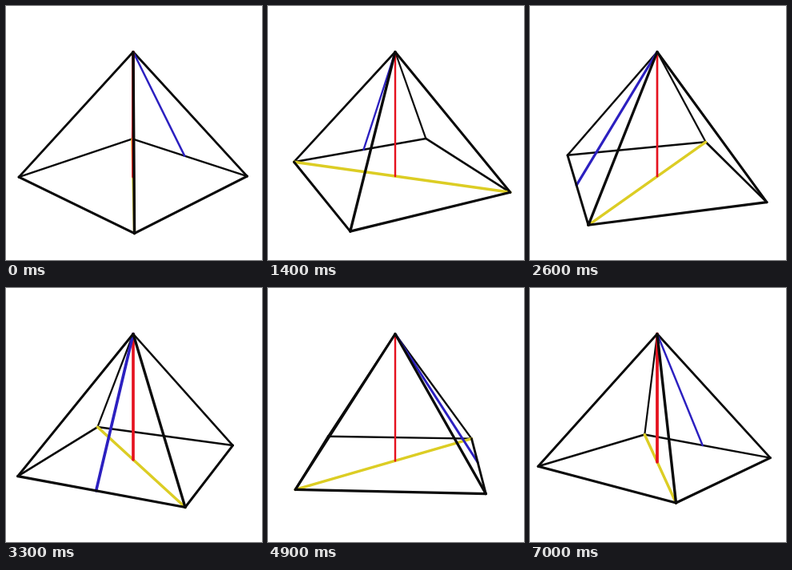
An HTML page with a canvas that plays this animation: 320 by 318 pixels, repeating every 7.1 s.

```html
<!DOCTYPE html>
<html lang="en">
<head>
<meta charset="utf-8">
<title>Turning pyramid</title>
<style>
  html, body { margin: 0; width: 100%; height: 100%; overflow: hidden; background: #fff; }
  canvas { display: block; width: 100%; height: 100%; }
</style>
</head>
<body>
<canvas id="stage" width="320" height="318"></canvas>
<script>
const ctx = document.getElementById('stage').getContext('2d');
const LOOP = 7100, STEP = 100, PERSPECTIVE = 0.2;
const APEX = { x: 159, y: 57.5 };
const INK = '#0a0a0a', RED = '#e5121f', BLUE = '#2c20c0', YELLOW = '#dccd24';

// Turn of the pyramid in degrees at a few moments: speeding up, braking, resting, starting again.
const TURNS = [
  [0, 135.5], [1400, 206.3], [2600, 285], [3300, 336.6], [4200, 417.3],
  [4500, 438], [4900, 446.7], [6400, 446.7], [7000, 502.4]
];

const rad = deg => deg * Math.PI / 180;

function ease(time, start, end) {
  const u = Math.min(1, Math.max(0, (time - start) / (end - start)));
  return u * u * (3 - 2 * u);
}

const chord = i => {
  const [t0, a0] = TURNS[i], [t1, a1] = TURNS[i + 1];
  return (a1 - a0) / (t1 - t0);
};

// Harmonic mean of the neighbouring chords, so the curve never overshoots.
function speedAt(i) {
  if (i === 0) return chord(0);
  if (i === TURNS.length - 1) return chord(i - 1);
  const before = chord(i - 1), after = chord(i);
  return 2 * before * after / (before + after);
}

function turnAt(time) {
  let i = 0;
  while (i < TURNS.length - 2 && time >= TURNS[i + 1][0]) i++;
  const [t0, a0] = TURNS[i], [t1, a1] = TURNS[i + 1];
  const span = t1 - t0, u = (time - t0) / span, w = 1 - u;
  return a0 + (a1 - a0) * ease(u, 0, 1)
    + span * u * w * (speedAt(i) * w - speedAt(i + 1) * u);
}

const tiltAt = time => 0.398 + 0.018 * ease(time, 0, 1400)
  - 0.091 * ease(time, 2300, 4100) - 0.042 * ease(time, 6400, 7000);

function line(from, to, color, width) {
  ctx.strokeStyle = color;
  ctx.lineWidth = width;
  ctx.beginPath();
  ctx.moveTo(from.x, from.y);
  ctx.lineTo(to.x, to.y);
  ctx.stroke();
}

function draw(time) {
  const turn = turnAt(time), tilt = tiltAt(time);
  const radius = 155 - 31 * tilt;
  const center = { x: APEX.x, y: 228 - 36 * tilt };

  // Angle 0 faces the viewer, 90 points right.
  const project = (angle, reach) => {
    const side = Math.sin(rad(angle)) * reach, near = Math.cos(rad(angle)) * reach;
    const scale = radius / (1 - PERSPECTIVE * near);
    return { x: center.x + side * scale, y: center.y + near * scale * tilt, near };
  };

  const corners = [45, 135, 225, 315].map(offset => project(turn + offset, 1));
  const foot = project(turn, Math.SQRT1_2);

  const edges = corners.flatMap((corner, i) => {
    const next = corners[(i + 1) % 4];
    return [
      { from: APEX, to: corner, near: corner.near },
      { from: corner, to: next, near: (corner.near + next.near) / 2 }
    ];
  });
  const drawEdges = list => list.forEach(e => line(e.from, e.to, INK, 2.8 + 0.6 * e.near));
  const drawSlant = () => line(APEX, foot, BLUE, 3 + foot.near);

  ctx.fillStyle = '#fff';
  ctx.fillRect(0, 0, 320, 318);
  ctx.lineCap = 'round';

  drawEdges(edges.filter(e => e.near < 0));
  line(corners[0], corners[2], YELLOW, 3.4);
  if (foot.near < 0) drawSlant();
  line(APEX, center, RED, 2.4 + 1.4 * Math.cos(rad(turn - 145)) ** 6);
  if (foot.near >= 0) drawSlant();
  drawEdges(edges.filter(e => e.near >= 0));
}

function frame() {
  const time = performance.now() % LOOP;
  draw(Math.floor(time / STEP) * STEP);
  requestAnimationFrame(frame);
}
frame();
</script>
</body>
</html>
```
